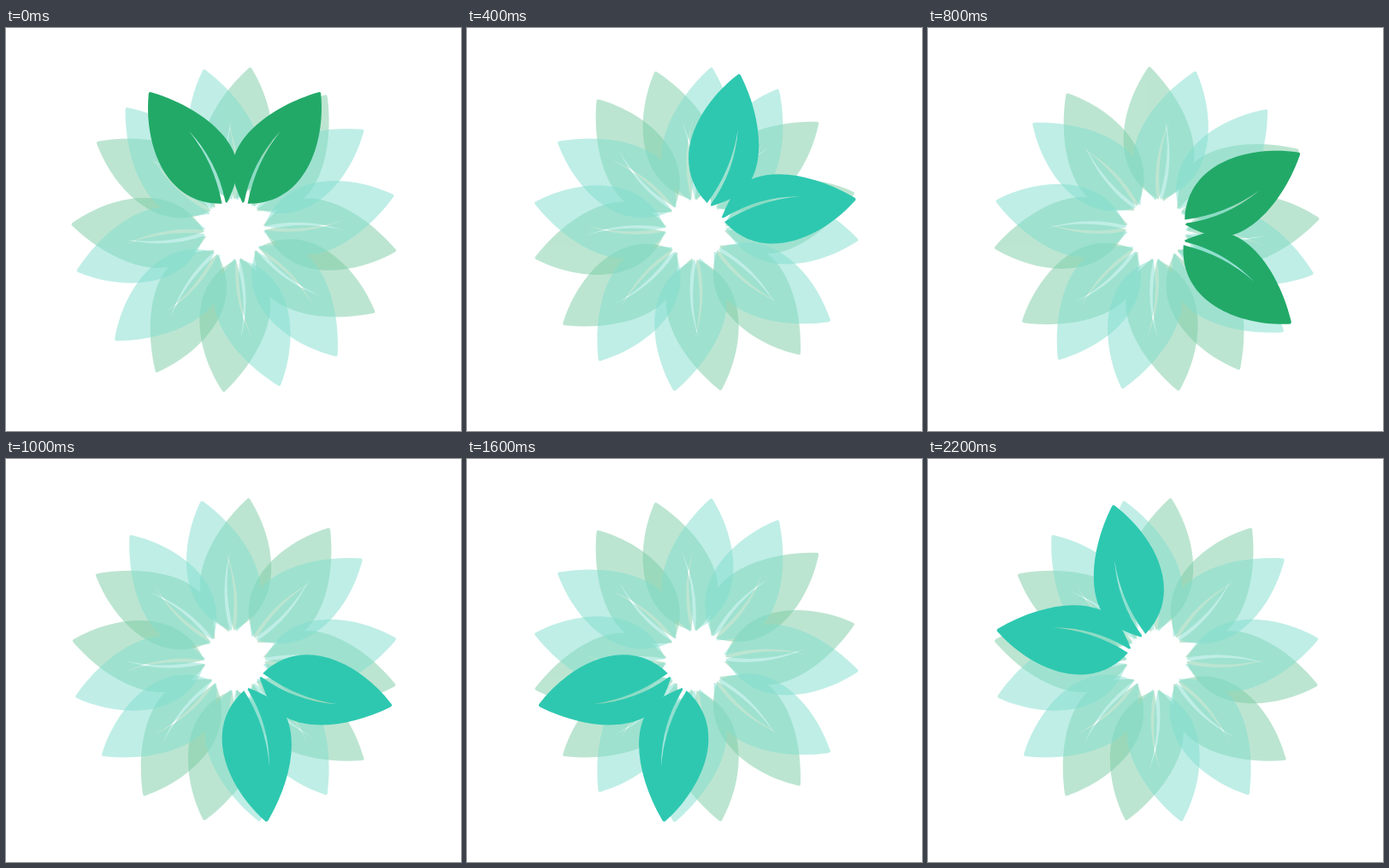
Animation, 532 px wide and 472 px high, one loop 2.3 s. Source, as an HTML page:

```html
<!DOCTYPE html>
<html lang="en">
<head>
<meta charset="utf-8">
<title>Leaf ring</title>
<style>
  html, body { margin: 0; width: 532px; height: 472px; overflow: hidden; background: #fff; }
  svg { display: block; }
</style>
</head>
<body>
<svg width="532" height="472" viewBox="0 0 532 472">
  <defs>
    <path id="leaf" d="M-100.8 -159.5 Q-101 -163.8 -97 -162.3
      C-42 -146 6 -108 3 -68 Q1 -54 -9 -33 L-11 -34
      Q-20 -81 -53.5 -117 Q-24 -80 -15 -32
      C-82 -31 -106 -102 -100.8 -159.5 Z"/>
    <g id="sprout">
      <use href="#leaf"/>
      <use href="#leaf" transform="scale(-1 1)"/>
    </g>
  </defs>
  <g id="ring" transform="translate(267.1 235.9)"></g>
  <g id="front" transform="translate(267.5 237.7)"></g>
</svg>
<script>
const GREEN = '#22a968', TEAL = '#2ec8b0';
const PALE_GREEN = '#7bcda5', PALE_TEAL = '#81decf';
const STEP = 100, LOOP = 2300, COUNT = 8, GAP = 360 / COUNT;

const cos = deg => Math.cos(deg * Math.PI / 180);
const sin = deg => Math.sin(deg * Math.PI / 180);

function addSprout(parent, color, opacity) {
  const el = document.createElementNS('http://www.w3.org/2000/svg', 'use');
  el.setAttribute('href', '#sprout');
  el.setAttribute('fill', color);
  // One opacity per sprout, so its two leaves never darken each other.
  el.setAttribute('opacity', opacity);
  return document.getElementById(parent).appendChild(el);
}

// Green sprouts lie below the teal ones.
const pale = [];
for (const odd of [1, 0]) {
  for (let i = odd; i < COUNT; i += 2) {
    pale[i] = addSprout('ring', odd ? PALE_GREEN : PALE_TEAL, 0.5);
  }
}
const lead = addSprout('front', GREEN, 1);

function turn(el, angle) {
  el.setAttribute('transform', `rotate(${angle.toFixed(2)})`);
}

// The ring sways as a whole while a small ripple runs around it.
function sway(step, axis) {
  const beat = step % 12, w = beat * 30;
  return -1 - 6.3 * cos(w - 36) + 1.7 * cos(2 * w)
    + 3 * cos(axis - 45 * beat - 50);
}

function draw(ms) {
  const step = Math.floor((ms % LOOP) / STEP);

  const shift = Math.floor((step + 3) / 6);
  pale.forEach((el, i) => {
    const axis = (i + shift + 0.5) * GAP;
    turn(el, axis + sway(step, axis));
  });

  const jump = Math.floor(step / 3);
  turn(lead, jump * GAP + 3 * sin(jump * GAP));
  lead.setAttribute('fill', jump % 2 ? TEAL : GREEN);
}

const begin = performance.now();
function tick() {
  draw(performance.now() - begin);
  requestAnimationFrame(tick);
}
tick();
</script>
</body>
</html>
```
